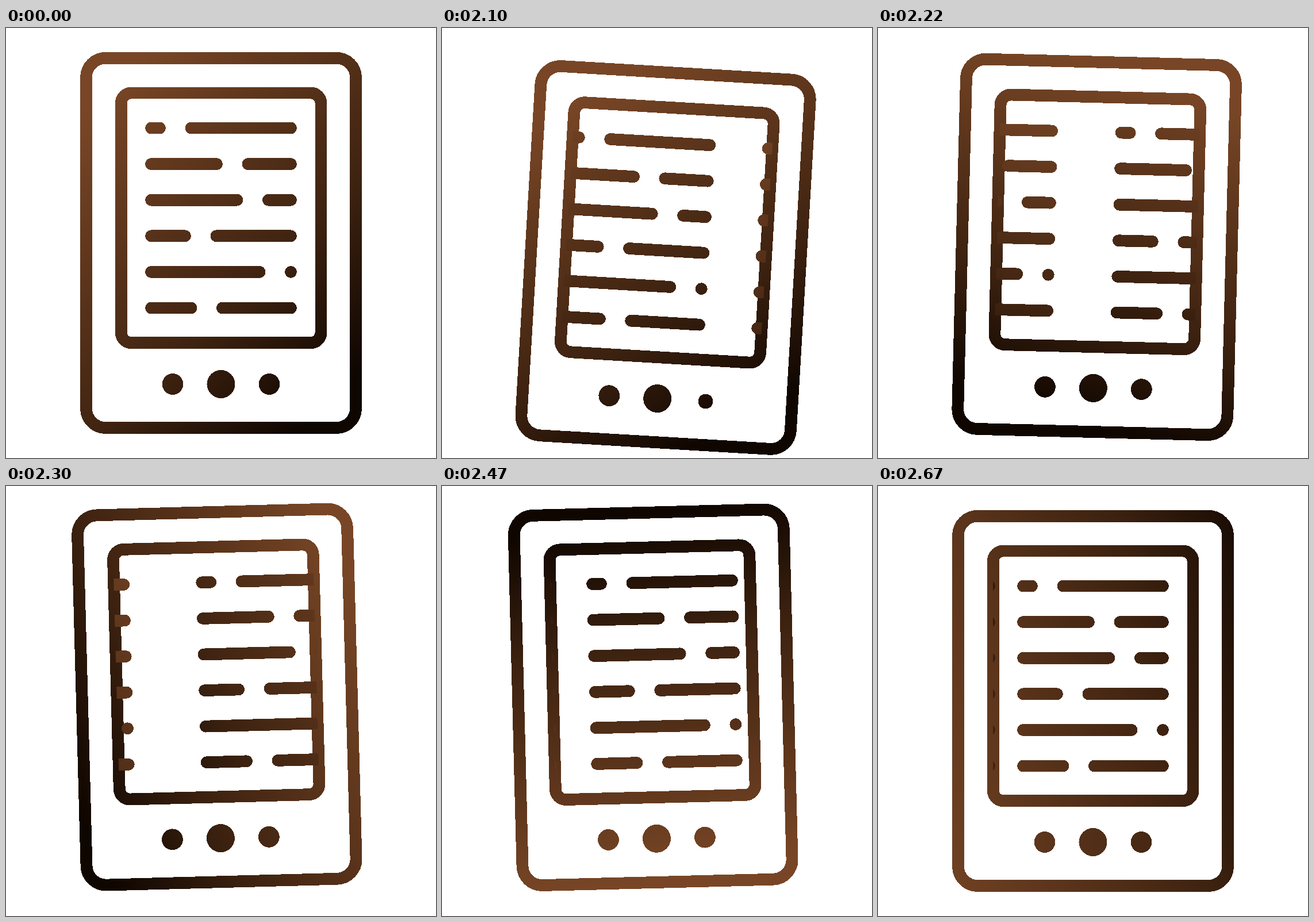
Animation, 748 px wide and 748 px high, one loop 2.7 s. Source, as an HTML page:

```html
<!DOCTYPE html>
<html lang="en">
<head>
<meta charset="utf-8">
<title>E-reader page turn</title>
<style>
  html, body { margin: 0; width: 100%; height: 100%; overflow: hidden; background: #fff; }
  svg { display: block; width: 100vw; height: 100vh; }
</style>
</head>
<body>
<svg viewBox="0 0 748 748" shape-rendering="crispEdges">
  <defs>
    <linearGradient id="ink" gradientUnits="userSpaceOnUse">
      <stop offset="0" stop-color="#784626"/>
      <stop offset=".65" stop-color="#3d2210"/>
      <stop offset="1" stop-color="#0f0600"/>
    </linearGradient>
    <clipPath id="screen"><rect x="200" y="113" width="348" height="435"/></clipPath>
  </defs>
  <g id="reader" fill="none" stroke="url(#ink)" stroke-width="20.8" stroke-linecap="round">
    <rect x="139.4" y="52.2" width="469.2" height="643.4" rx="34"/>
    <rect x="200.2" y="112.9" width="347.8" height="434.8" rx="18"/>
    <g clip-path="url(#screen)" id="pages"></g>
    <g fill="url(#ink)" stroke="none">
      <circle cx="290" cy="619.5" r="18.4"/>
      <circle cx="374" cy="619.5" r="24.5"/>
      <circle id="next" cx="458" cy="619.5" r="18.4"/>
    </g>
  </g>
</svg>
<script>
const LOOP = 2700, REST = 2000, STEP = 25;
const $ = id => document.getElementById(id);

// Keys are [step, value]; time is counted in 25 ms steps after the rest.
const motion = {
  angle: [[0, 0], [5.4, 4.04], [13.4, -2.03], [15.3, -2.03], [26, 0]],
  drop: [[0, 0], [2.58, 12.5], [8.2, 1.2], [15, -0.9], [19, 0]],
  button: [[0, 1], [1.85, 0.6], [8.4, 1]],
  oldPage: [[0, 0], [14.5, -302]],
  newPage: [[1, 310], [4, 288], [9, 159], [15, 56], [19, 21], [26, 0]],
  inkAngle: [[0, 45], [4, 57], [9, 106], [15, 210], [19, 262], [27, 345]],
  inkReach: [[0, 325], [9, 300], [19, 315], [27, 390]]
};

// Monotone cubic interpolation: flat at the ends and at turning points.
function at(keys, x) {
  const last = keys.length - 1;
  if (x <= keys[0][0]) return keys[0][1];
  if (x >= keys[last][0]) return keys[last][1];
  const rise = i => (keys[i + 1][1] - keys[i][1]) / (keys[i + 1][0] - keys[i][0]);
  const slope = i => {
    if (i === 0 || i === last) return 0;
    const a = rise(i - 1), b = rise(i);
    return a * b > 0 ? 2 * a * b / (a + b) : 0;
  };
  const i = keys.findIndex(k => k[0] > x) - 1;
  const [x0, y0] = keys[i], [x1, y1] = keys[i + 1];
  const w = x1 - x0, u = (x - x0) / w, v = 1 - u;
  return y0 + (y1 - y0) * u * u * (3 - 2 * u)
    + w * u * v * (v * slope(i) - u * slope(i + 1));
}

// Each row is two dashes separated by one gap.
const LEFT = 252.5, RIGHT = 495.5, GAP = 54.4;
const rows = [267.5, 366.5, 402, 311.5, 441, 322].map((end, i) => {
  const y = 174 + i * 62.6;
  return `M${LEFT} ${y}H${end}M${Math.min(end + GAP, RIGHT - 0.01)} ${y}H${RIGHT}`;
}).join("");

function addPage() {
  const page = document.createElementNS("http://www.w3.org/2000/svg", "path");
  page.setAttribute("d", rows);
  return $("pages").appendChild(page);
}
const oldPage = addPage(), newPage = addPage();

function draw(time) {
  const elapsed = Math.floor(time / 10) * 10 - REST;
  const step = Math.max(0, Math.floor((elapsed + 5) / STEP));
  const value = name => at(motion[name], step);

  $("reader").setAttribute("transform",
    `translate(0 ${value("drop")}) rotate(${value("angle")} 132 638)`);
  $("next").setAttribute("r", 18.4 * value("button"));
  oldPage.setAttribute("transform", `translate(${value("oldPage")} 0)`);
  newPage.setAttribute("transform", `translate(${value("newPage")} 0)`);

  const turn = value("inkAngle") * Math.PI / 180, reach = value("inkReach");
  const dx = reach * Math.cos(turn), dy = reach * Math.sin(turn);
  const ends = { x1: 374 - dx, y1: 374 - dy, x2: 374 + dx, y2: 374 + dy };
  for (const key in ends) $("ink").setAttribute(key, ends[key]);
}

const start = performance.now();
function tick() {
  draw((performance.now() - start) % LOOP);
  requestAnimationFrame(tick);
}
tick();
</script>
</body>
</html>
```
